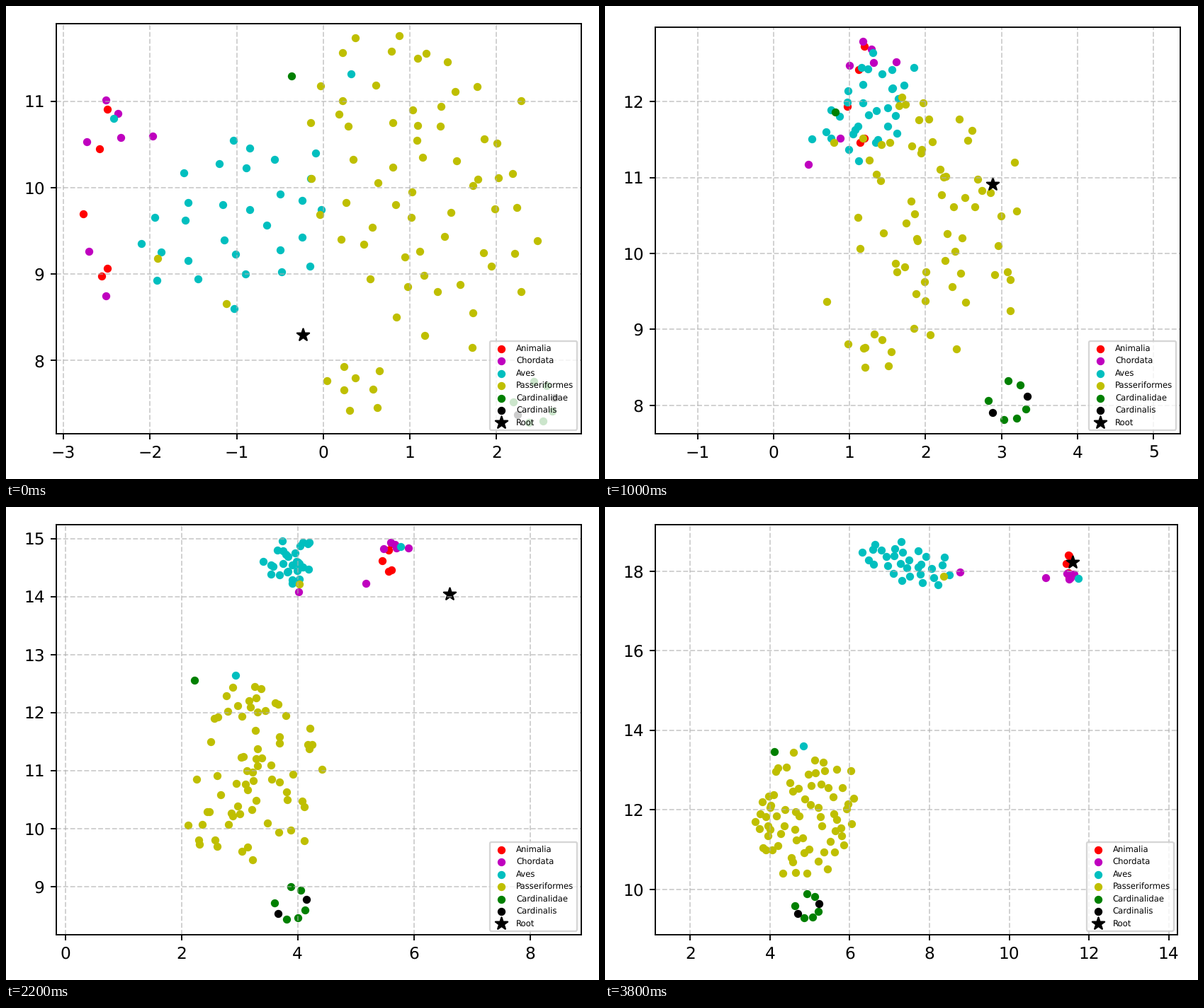
A matplotlib script for the animation above (4000 ms loop, 837 by 669 pixels).

```python
import numpy as np
import matplotlib.pyplot as plt
from matplotlib.animation import FuncAnimation

FRAMES = 20
INTERVAL = 200
GOLDEN = np.pi * (3 - np.sqrt(5))

plt.rcParams["text.hinting"] = "none"
rng = np.random.default_rng(4)


# Every group is an array of rows: start x, start y, end x, end y.

def cloud(n, left, right, bottom, top, lean=0.0):
    """Evenly scattered, slightly jittered points that fill a box."""
    k = np.arange(n) + 0.5
    x = np.sqrt(k / n) * np.cos(GOLDEN * k)
    y = np.sqrt(k / n) * np.sin(GOLDEN * k) + lean * x
    p = np.column_stack([x, y]) + rng.uniform(-0.1, 0.1, (n, 2))
    p = (p - p.min(axis=0)) / np.ptp(p, axis=0)
    return p * (right - left, top - bottom) + (left, bottom)


def flow(start, end, axis, sign, blur):
    """Pair two clouds by their loosely kept order along one axis."""
    rank = sign * start[:, axis] + rng.normal(0, blur, len(start))
    paired = np.empty_like(end)
    paired[np.argsort(rank)] = end[np.argsort(end[:, axis])]
    return np.hstack([start, paired])


def gather(*points):
    """Points that fly to the tight knot at the upper right."""
    p = np.array(points)
    x, y = p.T
    return np.column_stack([p, 11.5 + 0.25 * (x + 2.5), 18.4 - 0.3 * (y - 9)])


def ring(n):
    """Open ring that drifts and grows a little."""
    a = np.linspace(np.pi, 2.5 * np.pi, n)
    d = np.column_stack([np.cos(a), np.sin(a)])
    return np.hstack([(2.43, 7.52) + 0.24 * d, (4.93, 9.58) + 0.31 * d])


animalia = gather((-2.49, 10.91), (-2.58, 10.45), (-2.77, 9.7),
                  (-2.49, 9.07), (-2.56, 8.98))

chordata = np.vstack([
    gather((-2.51, 11.01), (-2.37, 10.86), (-2.34, 10.58),
           (-2.73, 10.53), (-1.97, 10.6)),
    (-2.71, 9.26, 10.91, 17.84),
    (-2.51, 8.75, 8.76, 17.97)])

aves = np.vstack([
    flow(cloud(30, -2.1, -0.02, 8.6, 10.55, lean=0.2),
         cloud(30, 6.31, 8.49, 17.66, 18.74, lean=-0.6),
         axis=0, sign=-1, blur=0.4),
    (-2.42, 10.8, 11.73, 17.81),
    (0.32, 11.32, 4.83, 13.61)])

passeriformes = np.vstack([
    flow(cloud(62, -0.15, 2.47, 8.15, 11.76, lean=-0.25),
         cloud(62, 3.75, 6.1, 10.4, 13.44),
         axis=1, sign=1, blur=1.1),
    flow(cloud(8, 0.04, 0.65, 7.42, 7.93),
         cloud(8, 3.62, 4.05, 11.0, 12.2),
         axis=0, sign=1, blur=0.2),
    (-1.12, 8.66, 5.8, 11.35),
    (-1.91, 9.18, 8.35, 17.87)])

flock = ring(8)
cardinalis = flock[[1, 5]]
cardinalidae = np.vstack([np.delete(flock, [1, 5], axis=0),
                          (-0.37, 11.29, 4.11, 13.47)])

root = np.array([[-0.235, 8.3, 11.595, 18.219]])

GROUPS = (
    ("Animalia", "r", animalia),
    ("Chordata", "m", chordata),
    ("Aves", "c", aves),
    ("Passeriformes", "y", passeriformes),
    ("Cardinalidae", "g", cardinalidae),
    ("Cardinalis", "k", cardinalis),
    ("Root", "k", root),
)

fig = plt.figure(figsize=(5.0045, 4), dpi=167.25)


def draw(frame):
    # Start from the default margins so each layout depends on its frame alone.
    fig.clear()
    fig.subplots_adjust(left=0.125, right=0.9, bottom=0.11, top=0.88)
    ax = fig.add_subplot()
    t = frame / (FRAMES - 1)
    for name, color, rows in GROUPS:
        x, y = ((1 - t) * rows[:, :2] + t * rows[:, 2:]).T
        star = name == "Root"
        ax.scatter(x, y, s=60 if star else 15, c=color,
                   marker="*" if star else "o", label=name)
    ax.grid(linestyle="--", alpha=0.6)
    ax.axis("equal")
    ax.legend(loc="lower right", fontsize=5)
    fig.tight_layout()
    return []


anim = FuncAnimation(fig, draw, frames=FRAMES, interval=INTERVAL,
                     repeat=True, repeat_delay=0, blit=False)
plt.show()
```
